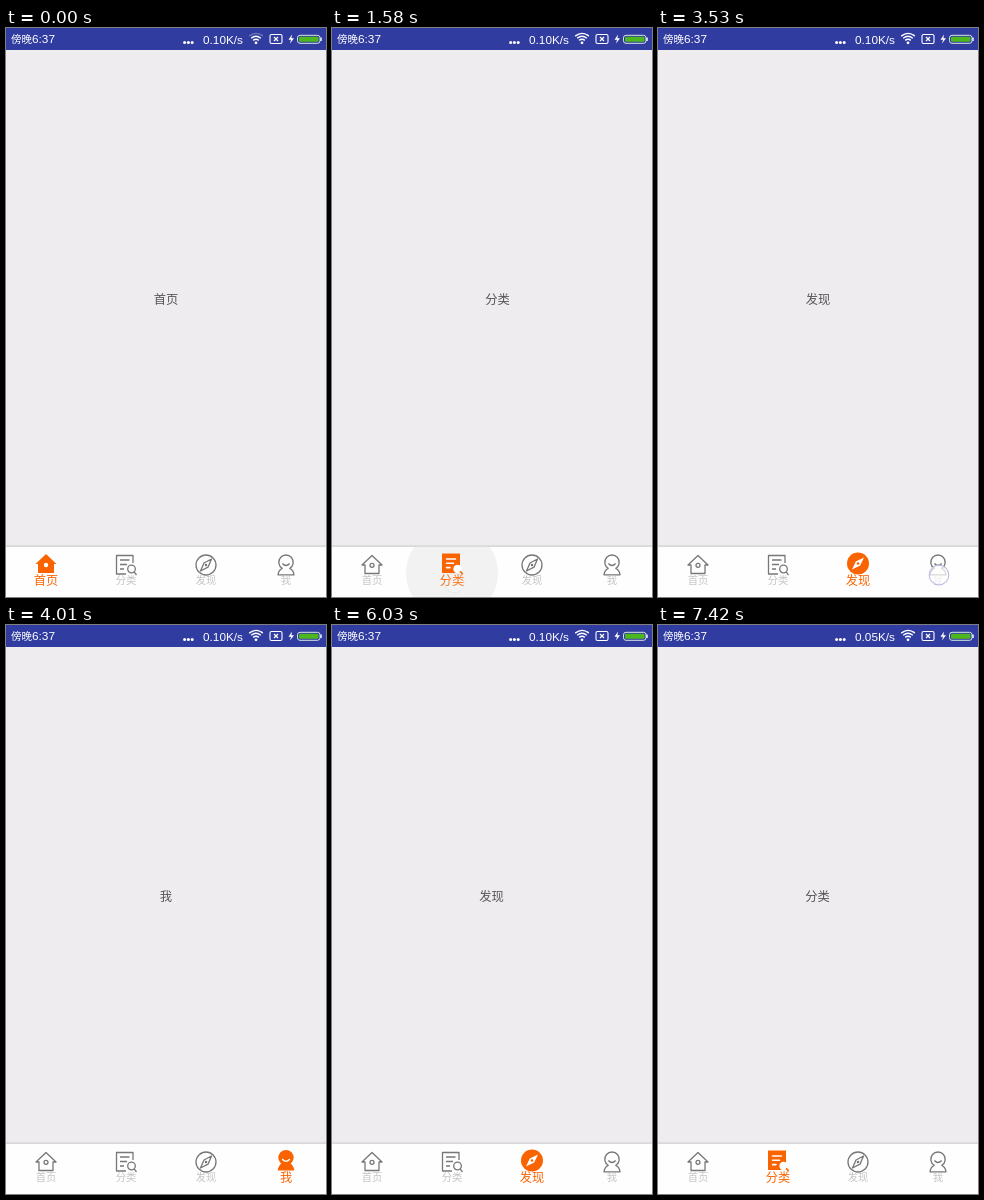
Write an HTML page that moves like this. It is 320 by 569 pixels and loops after 8000 ms.

```html
<!DOCTYPE html>
<html lang="zh">
<head>
<meta charset="utf-8">
<style>
  html, body { margin: 0; height: 100%; overflow: hidden; background: #eeecef; }
  svg { display: block; width: 100vw; height: 100vh; }
  text { font-family: "Noto Sans CJK SC", "Noto Sans CJK", sans-serif; text-anchor: middle; }
  .latin { font: 11.8px "Liberation Sans", sans-serif; }
  .page { font-size: 12.3px; fill: #555; }
  .off { fill: none; stroke: #777; stroke-width: 1.3; stroke-linejoin: round; }
  .on { fill: #fa6400; }
  .on .cut { fill: none; stroke: #fff; stroke-width: 1.6; stroke-linecap: round; }
  .off text { font-size: 10.3px; fill: #c4c4c4; stroke: none; }
  .on text { font-size: 12.2px; }
</style>
</head>
<body>
<svg viewBox="0 0 320 569" preserveAspectRatio="none">
  <clipPath id="bar"><rect y="519" width="320" height="50"/></clipPath>
  <rect width="320" height="569" fill="#eeecef"/>
  <g id="pages"></g>

  <rect width="320" height="22" fill="#303c9f"/>
  <g fill="#fff">
    <text x="15.6" y="15.3" font-size="10.5">傍晚</text>
    <text class="latin" x="37.5" y="15.3">6:37</text>
    <text class="latin" id="speed" x="237" y="15.5" style="text-anchor:end"></text>
    <circle cx="178.6" cy="14.5" r="1.5"/><circle cx="182.4" cy="14.5" r="1.5"/><circle cx="186.2" cy="14.5" r="1.5"/>
    <circle cx="250" cy="14.8" r="1.4"/>
    <path d="M286 6.5L282.5 11.7H285L284 15.5L288 10.2H285.4Z"/>
  </g>
  <g fill="none" stroke="#fff" stroke-width="1.4">
    <path d="M247.2 12.4Q250 10 252.8 12.4M245.2 10.2Q250 6.2 254.8 10.2"/>
    <path id="wifi" d="M243.2 8.1Q250 2.6 256.8 8.1"/>
    <rect x="264" y="6.5" width="12" height="9" rx="1.5" stroke-width="1.1"/>
    <path d="M268 9L272 13M272 9L268 13" stroke-width="1.2"/>
    <rect x="291.5" y="7.3" width="22.5" height="8" rx="2.5" stroke-width="1" stroke="#d9e6e0"/>
    <path d="M315 9.6V13"/>
  </g>
  <rect x="293" y="8.8" width="19.5" height="5" rx="1.2" fill="#4db81e"/>

  <rect y="517.3" width="320" height="2" fill="#d9d8da"/>
  <rect y="519" width="320" height="50" fill="#fefefe"/>
  <circle id="ripple" cy="545" clip-path="url(#bar)"/>
  <g id="tabs"></g>
  <circle id="touch" r="9.8" fill="#fff" fill-opacity=".7" stroke="#bcc0e2" stroke-width="1.2"/>
</svg>
<script>
const $ = id => document.getElementById(id);
const clamp = v => Math.min(1, Math.max(0, v));
const names = ['首页', '分类', '发现', '我'];

// Icons are drawn around the tab centre, [outlined, filled]
const icons = [
  ['<path d="M-10 537L0 527.5L10 537H7V545.5H-7V537Z"/><circle cy="537.3" r="2"/>',
   '<path d="M-10.5 536L0 526L10.5 536H8V545H-8V536Z"/><circle cy="537" r="2.2" fill="#fff"/>'],
  ['<path d="M0 546H-9.5V527.5H7V535M-6 532H3.5M-6 536.5H1M-6 541H-2M8.3 544.2L10.5 547"/><circle cx="5.5" cy="541" r="3.8"/>',
   '<path d="M-10 525.5H8V545H-10Z"/><path class="cut" d="M-5.5 531H3.5M-5.5 535.3H1.5M-5.5 539.6H-2"/><circle cx="5.5" cy="541" r="4.2" fill="#fff"/><path d="M8.2 543.2L10.8 546.2" stroke="#fa6400" stroke-width="1.6"/>'],
  ['<circle cy="537" r="10"/><path d="M5.5 531L2 539.2L-5.5 543L-2 535Z"/><circle cy="537" r=".6"/>',
   '<circle cy="535.5" r="11"/><path d="M6 529.5L2.2 537.6L-6 541.5L-2.2 533.4Z" fill="#fff"/><circle cy="535.5" r="1.3"/>'],
  ['<path d="M-3.8 540.3A7.2 7.2 0 1 1 3.8 540.3Q7.5 542 8 546.8H-8Q-7.5 542 -3.8 540.3Z"/><path d="M-3.6 535.5Q0 539.5 3.6 535.5"/>',
   '<circle cy="532.6" r="7.7"/><path d="M-4 538H4Q8 541 8.3 545.5H-8.3Q-8 541 -4 538Z"/><path class="cut" d="M-3.4 534.5Q0 538 3.4 534.5"/>']
];

$('pages').innerHTML = names.map((n, i) =>
  `<text class="page" x="${160 + 320 * i}" y="275.8">${n}</text>`).join('');
$('tabs').innerHTML = names.map((n, i) => `<g transform="translate(${40 + 80 * i})">` +
  icons[i].map((icon, on) => `<g class="${on ? 'on' : 'off'}">${icon}<text y="${on ? 557 : 556.2}">${n}</text></g>`).join('') +
  '</g>').join('');
const tabs = [...$('tabs').children];

const taps = [
  { down: 1350, x: 122.5, y: 555, tab: 1, end: 1810 },
  { down: 2490, x: 202, y: 548, end: 2950 },
  { down: 3530, x: 281, y: 547, tab: 3, end: 4010 }
];
const swipes = [
  { down: 5220, up: 5620, x: 93, len: 182, power: 1.6, page: 3 },
  { down: 6360, up: 7170, x: 15, len: 294, power: 1.2, page: 2 }
];
const travel = (s, t) => s.len * clamp((t - s.down) / (s.up - s.down)) ** s.power;
const dragged = (s, t) => s.page - Math.max(0, travel(s, t) - 14) / 320;

const moves = [
  { at: 0, time: 1, from: 0, to: 0 },
  { at: 1470, time: 200, from: 0, to: 1 },
  { at: 2616, time: 200, from: 1, to: 2 },
  { at: 3647, time: 200, from: 2, to: 3 },
  ...[600, 430].map((time, i) => {
    const s = swipes[i];
    return { at: s.up, time, from: dragged(s, s.up), to: s.page - 1 };
  })
];

function touch(x, y, alpha) {
  $('touch').setAttribute('cx', x);
  $('touch').setAttribute('cy', y);
  $('touch').setAttribute('opacity', alpha);
}

function draw(t) {
  const move = moves.findLast(m => t >= m.at);
  const swipe = swipes.find(s => t >= s.down && t < s.up);
  const tap = taps.find(p => t >= p.down && t < p.end);
  const ease = 1 - (1 - clamp((t - move.at) / move.time)) ** 5;
  const pos = swipe ? dragged(swipe, t) : move.from + (move.to - move.from) * ease;

  $('pages').setAttribute('transform', `translate(${-320 * pos})`);
  tabs.forEach((g, i) => {
    g.children[0].style.display = i === move.to ? 'none' : '';
    g.children[1].style.display = i === move.to ? '' : 'none';
  });

  touch(0, 0, 0);
  if (swipe) touch(swipe.x + travel(swipe, t), 311, 1);
  if (tap) touch(tap.x, tap.y, 1 - clamp((t - tap.down - 90) / 170));

  const ripple = $('ripple'), age = tap ? t - tap.down : 0;
  ripple.style.display = tap && tap.tab ? '' : 'none';
  if (tap && tap.tab) {
    ripple.setAttribute('cx', 40 + 80 * tap.tab);
    ripple.setAttribute('r', 46 * clamp(age / 230));
    ripple.setAttribute('opacity', 0.048 * (1 - clamp((age - 240) / 220)));
  }

  $('wifi').setAttribute('opacity', t < 350 ? 0.3 : 1);
  $('speed').textContent = t < 6700 ? '0.10K/s' : '0.05K/s';
}

const start = performance.now();
function frame() {
  draw((performance.now() - start) % 8000);
  requestAnimationFrame(frame);
}
frame();
</script>
</body>
</html>
```
